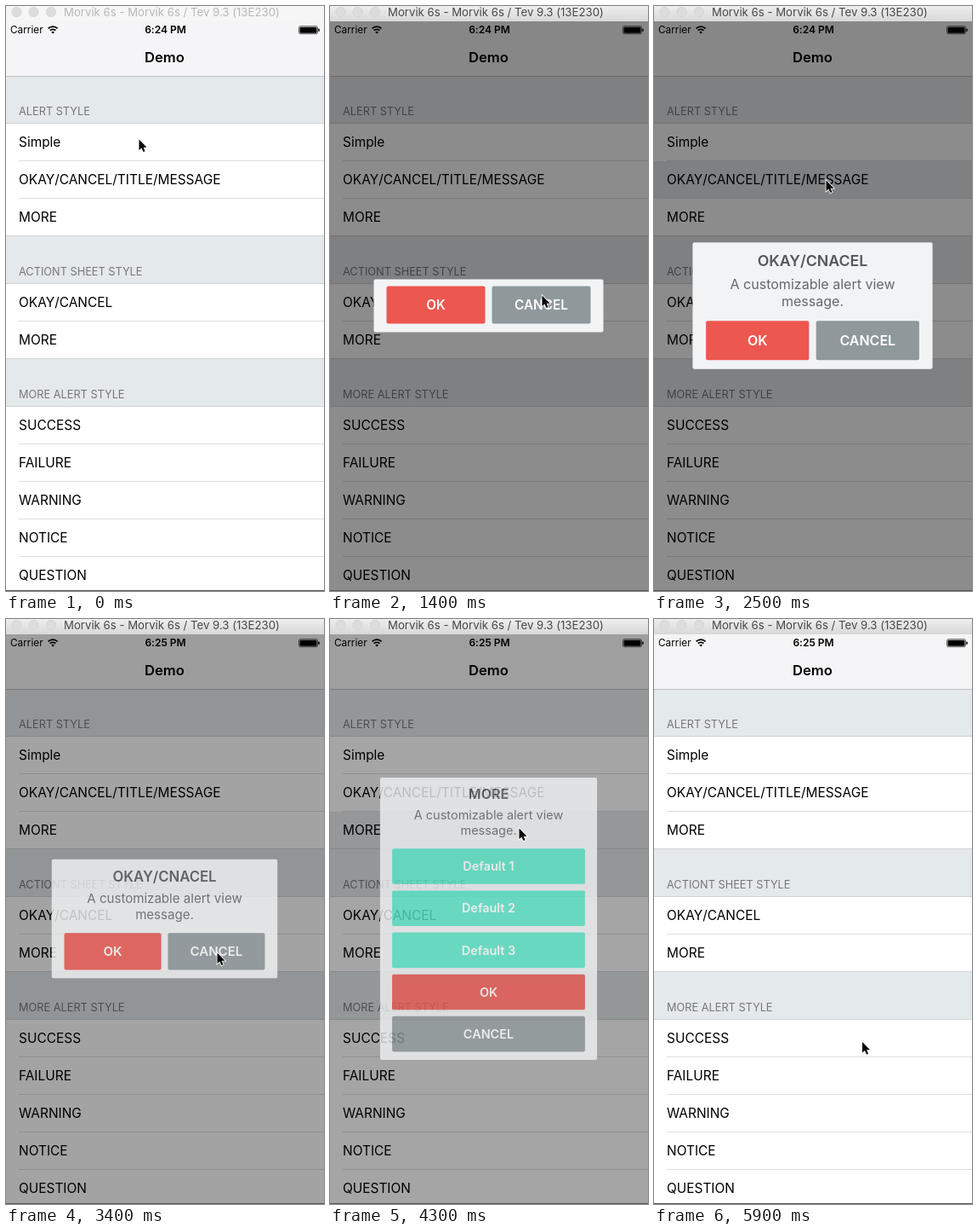
Write an HTML page that moves like this. It is 374 px wide and 686 px high and loops after 6000 ms.

```html
<!DOCTYPE html>
<html lang="en">
<head>
<meta charset="utf-8">
<title>Alert demo</title>
<style>
  html, body { margin: 0; width: 100%; height: 100%; overflow: hidden; background: #fff; }
  svg { display: block; }
  text {
    font-family: Inter, "Liberation Sans", sans-serif;
    font-feature-settings: "calt" 0;
    white-space: pre;
  }
  .mid { text-anchor: middle; }
  .bold { font-weight: 600; }
</style>
</head>
<body>
<svg id="stage" width="374" height="686" viewBox="0 0 374 686"></svg>
<script>
const LOOP = 6000, STEP = 100, CENTER_X = 186.5, CENTER_Y = 351.5;
const RED = '#ec5750', GRAY = '#8f999c', TEAL = '#58e8c8';

const rect = (x, y, w, h, fill, extra = '') =>
  `<rect x="${x}" y="${y}" width="${w}" height="${h}" fill="${fill}" ${extra}/>`;
const text = (x, y, size, fill, label, extra = '') =>
  `<text x="${x}" y="${y}" font-size="${size}" fill="${fill}" ${extra}>${label}</text>`;

const sections = [
  [82, 'ALERT STYLE', ['Simple', 'OKAY/CANCEL/TITLE/MESSAGE', 'MORE']],
  [270, 'ACTIONT SHEET STYLE', ['OKAY/CANCEL', 'MORE']],
  [414, 'MORE ALERT STYLE', ['SUCCESS', 'FAILURE', 'WARNING', 'NOTICE', 'QUESTION']],
];

function section([top, title, rows]) {
  const first = top + 56;
  return rect(0, top, 374, 56, '#e4e9eb') +
    text(15, first - 10.4, 12.75, '#76787c', title) +
    rows.map((label, i) => {
      const y = first + i * 44, last = i === rows.length - 1;
      return rect(0, y, 374, 44, '#fff', 'class="row"') +
        text(15, y + 26.7, 15.45, '#000', label) +
        (last ? rect(0, y + 43, 374, 1, '#d0d2d5') : rect(15, y + 43, 359, 1, '#dedee0'));
    }).join('') +
    rect(0, first - 1, 374, 1, '#d0d2d5');
}

const button = (x, y, w, fill, label) =>
  rect(x, y, w, 44, fill, 'rx="2"') +
  text(x + w / 2, y + 27.5, 15.3, '#fff', label, 'class="mid bold"');

// Popup contents are laid out around the popup center.
function popup(height, title, stacked) {
  const top = -height / 2, bottom = height / 2 - 54;
  const heading = title &&
    text(0, top + 26.5, 17, '#55575a', title, 'class="mid bold"') +
    text(0, top + 52, 15.35, '#66686b', 'A customizable alert view', 'class="mid"') +
    text(0, top + 71, 15.35, '#66686b', 'message.', 'class="mid"');
  const buttons = stacked
    ? [[TEAL, 'Default 1'], [TEAL, 'Default 2'], [TEAL, 'Default 3'], [RED, 'OK'], [GRAY, 'CANCEL']]
        .map(([fill, label], i) => button(-120, bottom - 52 * (4 - i), 240, fill, label)).join('')
    : button(-120, bottom, 116, RED, 'OK') + button(4, bottom, 116, GRAY, 'CANCEL');
  return `<g class="popup">${rect(-135, top, 270, height, '#f1f3f5', 'rx="2"')}${heading}${buttons}</g>`;
}

const stage = document.getElementById('stage');
stage.innerHTML =
  `<defs><linearGradient id="chrome" x2="0" y2="1">
    <stop stop-color="#eeeeee"/><stop offset="1" stop-color="#d8d8d8"/>
  </linearGradient></defs>` +
  rect(0, 18, 374, 64, '#f5f5f7') +
  text(5, 32.3, 11.8, '#000', 'Carrier') +
  `<g fill="none" stroke="#000" stroke-width="1.7">
    <path d="M49.6 26.4a7.8 7.8 0 0 1 11 0M51.7 28.7a4.8 4.8 0 0 1 6.8 0"/>
    <path d="M55.1 32.6l-1.8-1.9a2.6 2.6 0 0 1 3.6 0z" fill="#000" stroke="none"/>
  </g>` +
  text(187.5, 32.3, 12, '#000', '', 'id="clock" class="mid bold"') +
  rect(344.5, 23.7, 22, 9, 'none', 'rx="1.8" stroke="#000" stroke-width=".6"') +
  rect(345.5, 24.7, 20, 7, '#000', 'rx="1"') +
  rect(367.3, 26.5, 1.4, 3.4, '#000', 'rx=".7"') +
  text(186.5, 66, 16.6, '#000', 'Demo', 'class="mid bold"') +
  sections.map(section).join('') +
  rect(0, 82, 374, 1, '#bfc1c4') +
  rect(0, 18, 374, 668, '#000', 'id="dim"') +
  popup(62, '') + popup(142, 'OKAY/CNACEL') + popup(350, 'MORE', true) +
  rect(0, 685, 374, 1, '#555') +
  rect(0, 0, 374, 18, '', 'id="bar"') +
  [12.5, 32.5, 53].map(x =>
    `<circle cx="${x}" cy="7" r="5.7" fill="#dcdcdc" stroke="#cecece" stroke-width=".6"/>`).join('') +
  text(68, 11.7, 13.2, '', 'Morvik 6s - Morvik 6s / Tev 9.3 (13E230)', 'id="caption"') +
  `<path id="cursor" d="M0 0V12.6L2.9 9.9L5 14.6L7 13.7L5 9.2H9Z"
    stroke="#fff" stroke-width="1.6" paint-order="stroke"/>`;

const [clock, dim, bar, caption, cursor] =
  ['clock', 'dim', 'bar', 'caption', 'cursor'].map(id => document.getElementById(id));
const rows = stage.querySelectorAll('.row');
const popups = stage.querySelectorAll('.popup');

const shows = [[500, 1450], [2270, 3350], [4150, 5050]];   // open, close
const cursorPath = [
  [0, 156.5, 156.5], [600, 156.5, 156.5], [1200, 249.5, 339.5], [1450, 249.5, 339.5],
  [2100, 202.5, 204.5], [2550, 202.5, 204.5], [3100, 248.5, 391.5], [3450, 248.5, 391.5],
  [4000, 222.5, 245.5], [4350, 222.5, 245.5], [4850, 245, 486.5], [5100, 245, 486.5],
  [5500, 245, 496], [LOOP, 245, 496],
];
const opening = [[0, 0.8, 0], [150, 0.945, 0.78], [230, 1.045, 1], [430, 1, 1]];
const closing = [[0, 1, 1], [250, 0.915, 0]];

const clamp = v => Math.min(1, Math.max(0, v));
const smooth = u => u * u * (3 - 2 * u);

// Interpolates [time, a, b] keys.
function track(keys, t, ease = u => u) {
  let i = 1;
  while (i < keys.length - 1 && t > keys[i][0]) i++;
  const [t0, a0, b0] = keys[i - 1], [t1, a1, b1] = keys[i];
  const u = ease(clamp((t - t0) / (t1 - t0)));
  return [a0 + (a1 - a0) * u, b0 + (b1 - b0) * u];
}

function draw(t) {
  let shade = 0;
  shows.forEach(([open, close], i) => {
    const [scale, alpha] = t < close ? track(opening, t - open) : track(closing, t - close);
    shade = Math.max(shade, alpha);
    popups[i].setAttribute('opacity', alpha);
    popups[i].setAttribute('transform', `translate(${CENTER_X} ${CENTER_Y}) scale(${scale})`);
    const pressed = t < open - 100 ? 0 : clamp((open + 550 - t) / 250);
    rows[i].setAttribute('fill', `rgb(${255 - 25 * pressed},${255 - 22 * pressed},${255 - 19 * pressed})`);
  });
  dim.setAttribute('opacity', 0.45 * shade);
  clock.textContent = t < 3000 ? '6:24 PM' : '6:25 PM';
  const active = t >= 200;
  bar.setAttribute('fill', active ? 'url(#chrome)' : '#f6f6f6');
  caption.setAttribute('fill', active ? '#484848' : '#b8b8b8');
  cursor.setAttribute('transform', `translate(${track(cursorPath, t, smooth)})`);
}

function tick() {
  draw(Math.floor(performance.now() % LOOP / STEP) * STEP);
  requestAnimationFrame(tick);
}
tick();
</script>
</body>
</html>
```
